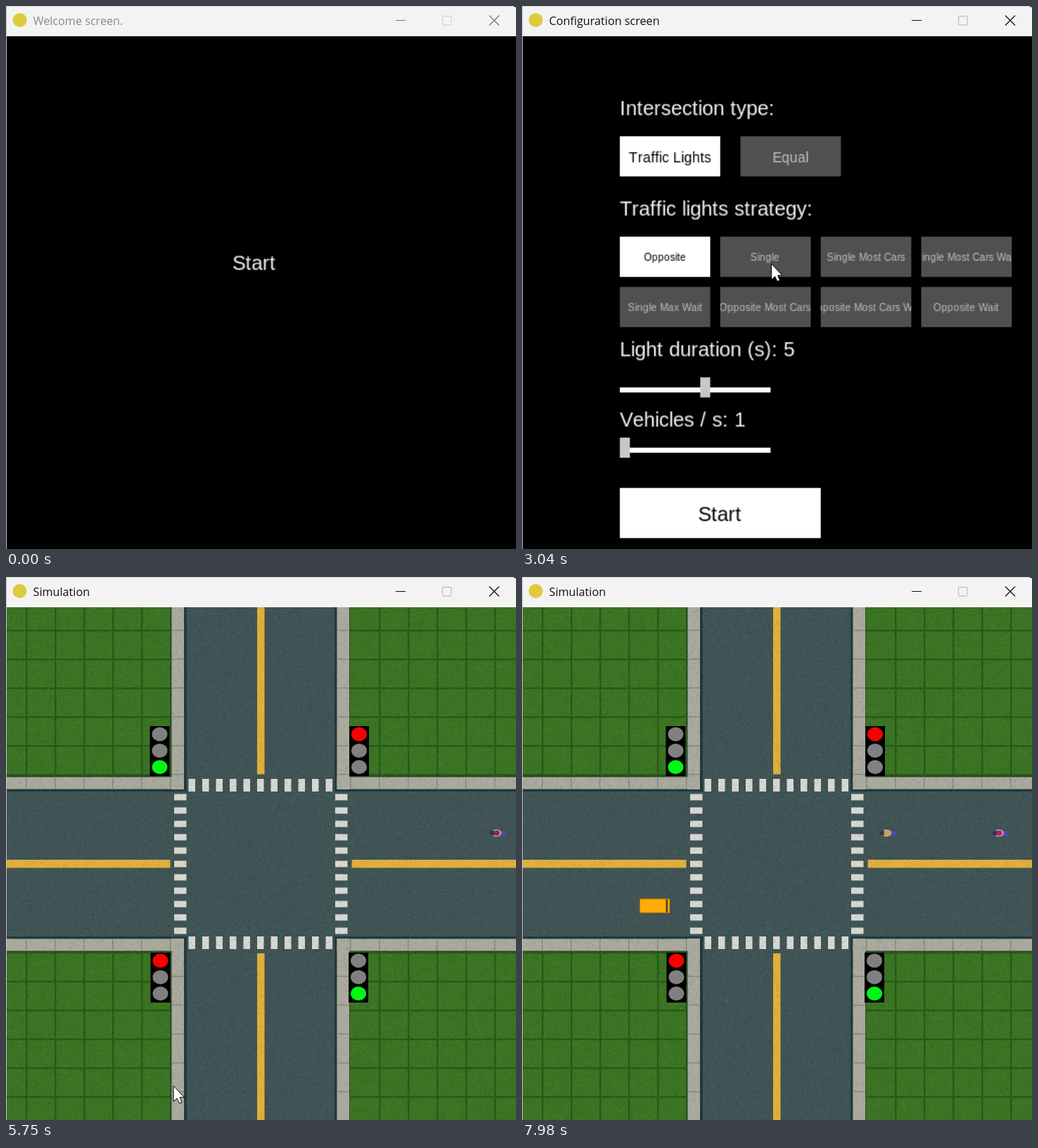
Recreate the animation shown at these times as an HTML page with a canvas. Size 725 by 772 pixels, loop 8000 ms.

```html
<!DOCTYPE html>
<html lang="en">
<head>
<meta charset="utf-8">
<title>Traffic simulation</title>
<style>
html, body { margin: 0; width: 100%; height: 100%; overflow: hidden; background: #000; }
canvas { display: block; }
</style>
</head>
<body>
<canvas id="stage" width="725" height="772"></canvas>
<script>
const W = 725, H = 772, LOOP = 8000;
const FOCUS = 1550, CONFIG = 2960, SIMULATION = 5750;
const stage = document.getElementById('stage').getContext('2d');
let ctx = stage;

// The menu screens are laid out on a small grid and scaled up
const MENU = { size: 512, scale: 10 / 7, x: -3.86, y: 42.2 };

// Pointer path: time, x, y
const POINTER = [
  [590, 630, 725], [720, 530, 590], [860, 410, 420], [1000, 345, 341], [1200, 338, 350],
  [1410, 340, 364], [2550, 340, 364], [2760, 354, 366], [3360, 354, 366], [3640, 361, 247],
  [3800, 350, 300], [4100, 320, 441], [4170, 320, 443], [4500, 225, 575], [4800, 165, 647],
  [5000, 149, 638], [5060, 149, 638], [5300, 180, 690], [5550, 205, 729], [5690, 205, 729],
  [6370, 568, 660], [6510, 575, 660], [6650, 664, 655]
];

function rect(x, y, w, h, color) {
  ctx.fillStyle = color;
  ctx.fillRect(x, y, w, h);
}

function ellipse(x, y, rx, ry, color) {
  ctx.fillStyle = color;
  ctx.beginPath();
  ctx.ellipse(x, y, rx, ry, 0, 0, 2 * Math.PI);
  ctx.fill();
}

function stroke(color, ...lines) {
  ctx.strokeStyle = color;
  ctx.lineWidth = 1.3;
  ctx.beginPath();
  for (const [x1, y1, x2, y2] of lines) {
    ctx.moveTo(x1, y1);
    ctx.lineTo(x2, y2);
  }
  ctx.stroke();
}

function offscreen(width, height, paint) {
  const canvas = document.createElement('canvas');
  canvas.width = width;
  canvas.height = height;
  ctx = canvas.getContext('2d');
  paint();
  ctx = stage;
  return canvas;
}

function titleBar(title, active) {
  rect(0, 0, W, 43, '#f3f3f3');
  rect(0, 0, W, 1, '#d8d8d8');
  rect(0, 0, 1, H, '#c4c4c4');
  rect(722, 0, 3, 1.5, '#333');
  ellipse(19.5, 20, 10, 10, '#decb3c');
  ctx.font = '16.2px "Open Sans", sans-serif';
  ctx.fillStyle = active ? '#111' : '#8a8a8a';
  ctx.fillText(title, 38.5, 26.5);
  const ink = active ? '#111' : '#777';
  rect(554, 20, 14, 1, ink);
  stroke(ink, [687, 13.5, 701, 27.5], [701, 13.5, 687, 27.5]);
  ctx.strokeStyle = active ? '#c3c3c3' : '#d6d6d6';
  ctx.beginPath();
  ctx.roundRect(620.5, 14.5, 12.5, 12.5, 1.5);
  ctx.stroke();
}

// Menu text advances by whole grid pixels per letter
const advance = letter => Math.round(ctx.measureText(letter).width);

function label(str, x, y, size = 20, color = '#f4f4f4', centered = false) {
  ctx.font = `${size}px "Liberation Sans", Arial, sans-serif`;
  ctx.fillStyle = color;
  const letters = [...str];
  if (centered) x = Math.floor(x - letters.reduce((sum, c) => sum + advance(c), 0) / 2);
  for (const c of letters) {
    ctx.fillText(c, x, y);
    x += advance(c);
  }
}

function button(str, x, y, w, h, size, selected) {
  ctx.save();
  ctx.beginPath();
  ctx.rect(x, y, w, h);
  ctx.clip();
  rect(x, y, w, h, selected ? '#fff' : '#505050');
  label(str, x + w / 2, y + h / 2 + Math.round(size * 0.4), size, selected ? '#000' : '#bebebe', true);
  ctx.restore();
}

function slider(y, handleX) {
  rect(100, y, 150, 5, '#fff');
  rect(handleX, y - 10, 10, 20, '#c8c8c8');
}

function paintWelcome() {
  label('Start', 250, 233, 20, '#f4f4f4', true);
}

function paintConfig() {
  label('Intersection type:', 100, 79);
  button('Traffic Lights', 100, 100, 100, 40, 14, true);
  button('Equal', 220, 100, 100, 40, 14);
  label('Traffic lights strategy:', 100, 179);
  ['Opposite', 'Single', 'Single Most Cars', 'Single Most Cars Wait',
   'Single Max Wait', 'Opposite Most Cars', 'Opposite Most Cars Wait', 'Opposite Wait']
    .forEach((str, i) =>
      button(str, 100 + i % 4 * 100, i < 4 ? 200 : 250, 90, 40, 10, i === 0));
  label('Light duration (s): 5', 100, 319);
  slider(350, 180);
  label('Vehicles / s: 1', 100, 389);
  slider(410, 100);
  button('Start', 100, 450, 200, 50, 20, true);
}

function trafficLight(x, y, go) {
  rect(x - 14, y, 28, 71, '#000');
  const lamps = go ? ['#808080', '#808080', '#00f814'] : ['#f80000', '#808080', '#808080'];
  lamps.forEach((color, i) => ellipse(x, y + 11.5 + i * 23.4, 11, 10, color));
}

function paintCrossroads() {
  rect(0, 42, W, H, '#3a7423');
  for (let i = 0; i < 6; i++) {
    for (const x of [28 + i * 41, 530 + i * 41]) rect(x, 42, 2.5, H, '#285a17');
    for (const y of [75 + i * 41, 533 + i * 41]) rect(0, y, W, 2.5, '#285a17');
  }
  // Kerbs with joints, then the two roads
  rect(234, 42, 255, H, '#2b4828');
  rect(0, 282, W, 251, '#2b4828');
  for (const x of [235.5, 470.5]) {
    rect(x, 42, 17.5, H, '#a9aa9d');
    for (let i = 0; i < 18; i++) rect(x, 75 + i * 41, 17.5, 1.5, '#85887d');
  }
  for (const y of [284.5, 514.5]) {
    rect(0, y, 253, 17, '#a9aa9d');
    rect(470.5, y, 255, 17, '#a9aa9d');
    for (let i = 0; i < 6; i++)
      for (const x of [28, 489]) rect(x + i * 41, y, 1.5, 17, '#85887d');
  }
  rect(253, 42, 217, H, '#22393d');
  rect(0, 302, W, 212, '#22393d');
  rect(257, 42, 210, H, '#405355');
  rect(0, 305, W, 206, '#405355');

  rect(357, 42, 10.5, 238.5, '#deb03c');
  rect(357, 535, 10.5, H, '#deb03c');
  rect(0, 402, 233.5, 11.5, '#deb03c');
  rect(491.5, 402, 234, 11.5, '#deb03c');
  for (let i = 0; i < 11; i++) {
    for (const y of [287, 511]) rect(259.5 + i * 19.5, y, 9.5, 18, '#d6d8d0');
    for (const x of [239, 468]) rect(x, 308.5 + i * 19, 17.5, 9, '#d6d8d0');
  }

  // Seeded surface grain
  let seed = 7;
  const random = () => (seed = seed * 16807 % 2147483647) / 2147483647;
  for (let i = 0; i < 50000; i++)
    rect(random() * W, 42 + random() * 730, 2, 2, i % 2 ? 'rgba(0,0,0,.05)' : 'rgba(255,255,255,.03)');

  trafficLight(218.5, 212, true);
  trafficLight(502, 212, false);
  trafficLight(219.5, 534, false);
  trafficLight(501, 534, true);
}

function bike(x, jacket) {
  rect(x + 1, 363, 24, 2.5, '#25283d');
  ellipse(x + 20, 364.5, 5, 3.5, '#514aa8');
  ellipse(x + 10, 364, 7.5, 5.3, '#a7a0b5');
  ellipse(x + 5, 364, 3, 3.5, '#35304b');
  ellipse(x + 10.5, 364, 4, 3.8, jacket);
}

function van(x) {
  rect(x, 457, 43, 21, '#b87a10');
  rect(x + 1, 458.5, 41.5, 18, '#ffad08');
  rect(x + 37.5, 458, 2.5, 19, '#553c12');
}

function simulation(t) {
  ctx.drawImage(crossroads, 0, 0);
  const firstX = Math.max(508, 588 - (t - 6370) * 0.16);
  bike(firstX, firstX > 508 ? '#8d2940' : '#e09a35');
  if (t >= 6655) van(167 - (7980 - t) * 0.117);
  if (t >= 7836) bike(668 + (7980 - t) * 0.16, '#c4175f');
}

function menu(screen) {
  const size = MENU.size * MENU.scale;
  ctx.drawImage(screen, MENU.x, MENU.y, size, size);
}

function pointer(t) {
  const next = POINTER.findIndex(p => p[0] > t);
  if (next < 1) return;
  const [t0, x0, y0] = POINTER[next - 1], [t1, x1, y1] = POINTER[next];
  const k = (t - t0) / (t1 - t0);
  ctx.save();
  ctx.translate(x0 + (x1 - x0) * k, y0 + (y1 - y0) * k);
  const arrow = new Path2D('M.5 .5V23L5.5 18.5 9 25.5 12.5 24 9.5 17H16Z');
  ctx.fillStyle = '#fff';
  ctx.fill(arrow);
  ctx.strokeStyle = '#000';
  ctx.lineWidth = 1;
  ctx.stroke(arrow);
  ctx.restore();
}

const welcome = offscreen(MENU.size, MENU.size, paintWelcome);
const config = offscreen(MENU.size, MENU.size, paintConfig);
const crossroads = offscreen(W, H, paintCrossroads);

const start = performance.now();
function draw() {
  const t = (performance.now() - start) % LOOP;
  rect(0, 0, W, H, '#000');
  if (t < CONFIG) {
    menu(welcome);
    titleBar('Welcome screen.', t >= FOCUS);
  } else if (t < SIMULATION) {
    menu(config);
    titleBar('Configuration screen', true);
  } else {
    simulation(t);
    titleBar('Simulation', true);
  }
  pointer(t);
  requestAnimationFrame(draw);
}
draw();
</script>
</body>
</html>
```
